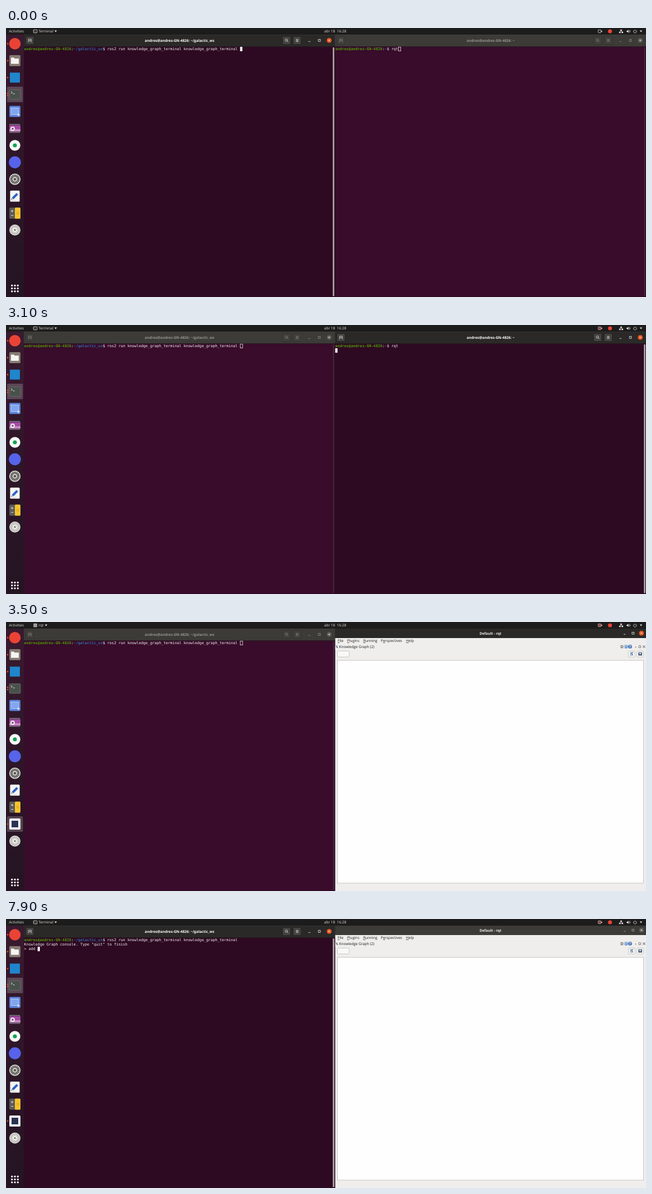
Animation, 1152 px wide and 486 px high, one loop 8 s. Source, as an HTML page:

```html
<!DOCTYPE html>
<html lang="en">
<head>
<meta charset="utf-8">
<title>Terminal session</title>
<style>
  html, body { margin: 0; width: 100%; height: 100%; overflow: hidden; background: #1d1d1d; }
  svg { display: block; width: 100vw; height: 100vh; }
  text { font: 6.55px "Open Sans", "Noto Sans", sans-serif; text-rendering: geometricPrecision; white-space: pre; }
  .b { font-weight: 700; font-size: 6.48px; }
  .mono { font: 6.727px "DejaVu Sans Mono", monospace; fill: #f4f1f3; }
  .user { font-weight: 700; fill: #4e9a06; }
  .path { font-weight: 700; fill: #3465a4; }
  .mid { text-anchor: middle; }
</style>
</head>
<body>
<svg id="stage" viewBox="0 0 1152 486" preserveAspectRatio="none"></svg>
<script>
const LOOP = 8000;
const CELL = 4.05, ROW = 8.1, LEFT = 32.6, TOP = 33.9, RIGHT_DX = 560;
const USER = 'andres@andres-GN-4826';

// drawing helpers
const rect = (x, y, w, h, fill, more = '') => `<rect x="${x}" y="${y}" width="${w}" height="${h}" fill="${fill}" ${more}/>`;
const disc = (x, y, r, fill, more = '') => `<circle cx="${x}" cy="${y}" r="${r}" fill="${fill}" ${more}/>`;
const line = (d, color, w = 0.8, more = '') => `<path d="${d}" fill="none" stroke="${color}" stroke-width="${w}" ${more}/>`;
const shape = (d, fill) => `<path d="${d}" fill="${fill}"/>`;
const text = (x, y, s, fill = '#fff', cls = '') => `<text x="${x}" y="${y}" fill="${fill}" class="${cls}">${s}</text>`;
const group = (id, body, more = '') => `<g id="${id}" ${more}>${body}</g>`;
const shift = (x, y, body) => `<g transform="translate(${x} ${y})">${body}</g>`;
const mono = (row, body) => `<text class="mono" x="${LEFT}" y="${TOP + 6.2 + row * ROW}">${body}</text>`;
const grid3 = draw => [-1, 0, 1].flatMap(y => [-1, 0, 1].map(x => draw(x, y))).join('');

function closeButton(x, y, on) {
  return disc(x, y, 4.4, on ? '#e95420' : '#5b5955') +
    line(`M${x - 1.5} ${y - 1.5}l3 3m0 -3l-3 3`, '#fff', 0.8);
}

function minMax(x, y, gap, color) {
  return line(`M${x - 1.7} ${y + 2}h3.4`, color) +
    rect(x + gap - 1.8, y - 1.8, 3.6, 3.6, 'none', `stroke="${color}" stroke-width=".8"`);
}

function header(title, on) {
  const ink = on ? '#f2f1f0' : '#8f8d89';
  const face = on ? '#454341' : '#403f3b', edge = on ? '#1b1a19' : '#2f2e2b';
  const button = x => rect(x - 7.2, 15.2, 14.4, 14.6, face, `rx="1.6" stroke="${edge}" stroke-width=".7"`);
  return rect(32, 12, 560, 21.5, on ? '#2b2928' : '#3c3b37') +
    rect(32, 12, 560, 0.7, on ? '#393735' : '#464541') +
    rect(32, 33, 560, 0.7, '#1f1b1d') +
    button(43) + button(505) + button(524) +
    line('M40.5 24.7v-4.6h5v4.6M39.8 24.8h1.6m3.2 0h1.6M43 21.3v2.6m-1.3 -1.3h2.6', ink, 0.7) +
    `<circle cx="504.6" cy="21.8" r="2" fill="none" stroke="${ink}" stroke-width=".8"/>` +
    line('M506.1 23.3l1.8 1.8', ink, 0.9) +
    line('M521.8 20.6h4.6m-4.6 1.9h4.6m-4.6 1.9h4.6', ink, 0.8) +
    text(312.4, 24.6, title, on ? '#fff' : '#96948f', 'b mid') +
    minMax(546, 22.4, 18, ink) + closeButton(581.7, 22.4, on);
}

function terminal(side, title, lines) {
  return rect(32, 33, 560, 453, '#2a0a20') +
    rect(32, 33, 559, 452, '#380c2a') +
    rect(32, 33, 559, 452, '#2e0a22', `id="bg${side}"`) +
    rect(588.6, 35, 2, 449, '#57404e', 'opacity=".55"') +
    rect(588.2, 35, 2.7, 449.5, '#aca8a5', `id="bar${side}" rx="1"`) +
    lines + rect(0, 0, CELL, ROW, '#fff', `id="cur${side}"`) +
    header(title, false) + group('head' + side, header(title, true));
}

const prompt = (path, cmd) =>
  `<tspan class="user">${USER}</tspan>:<tspan class="path">${path}</tspan>$ ${cmd}`;

// plugin window
function plugin() {
  const u = s => `<tspan text-decoration="underline">${s}</tspan>`;
  const menu = [[597, u('F') + 'ile'], [614, u('P') + 'lugins'], [643, u('R') + 'unning'],
    [674.7, 'P' + u('e') + 'rspectives'], [720, u('H') + 'elp']];
  const button = (x, w) => rect(x, 52.5, w, 10.7, '#f8f8f7', 'rx="1.2" stroke="#bdbbb8" stroke-width=".8"');
  const bar = on => rect(592.6, 12, 559.4, 17.2, on ? '#2b2928' : '#3c3b37') +
    minMax(1113.5, 20.2, 15.2, on ? '#f2f1f0' : '#aaa8a4') + closeButton(1143.8, 20.2, on);
  const body = rect(592.6, 29, 559.4, 464, '#efeeed') +
    menu.map(([x, s]) => text(x, 36.2, s, '#1b1b1b')).join('') +
    line('M593.6 42.6l3.8 4.2', '#3d4a63', 1.2) + line('M597.3 42.4l-3.4 4.4', '#7d8ea8', 1) +
    text(599.4, 47.2, 'Knowledge Graph (2)', '#1b1b1b') +
    rect(1105.5, 41.4, 6.4, 6.6, '#dcdad7') + text(1106.3, 47.2, 'D', '#111') +
    disc(1116.2, 44.5, 3.4, '#7fa3cf') + line('M1114.2 45.6a2 2 0 0 1 4 -2', '#e8f0fa', 0.8) +
    disc(1123.3, 44.5, 3.5, '#4b78b4') + text(1123.3, 46.8, '?', '#fff', 'b mid') +
    text(1132.4, 47.2, '-', '#111', 'b') + text(1138.3, 47.2, 'O', '#111') +
    line('M1146.4 42.6l4 4m0 -4l-4 4', '#777', 1.1) +
    button(596.5, 21.2) + button(1120.3, 11.9) + button(1135.6, 11.9) +
    rect(1123.2, 54.4, 5, 6.6, '#a9bdd3') + line('M1125 55l3.6 5.2m-1.3 -4.6l2 -1', '#4a6284', 1) +
    rect(1138.2, 54.8, 6.8, 5.8, '#4d5f7d') + rect(1140, 56, 3.2, 2, '#dfe6ef') +
    rect(596.6, 69.2, 551, 402.6, '#fefefe', 'stroke="#bcbab7" stroke-width=".8"');
  return rect(588, 8, 568, 480, '#000', 'opacity=".22" rx="4" id="shade"') +
    bar(false) + group('pluginOn', bar(true)) +
    text(872, 22.8, 'Default - rqt', '#f0eeeb', 'b mid') +
    group('pluginBody', body) + rect(592.6, 29, 559.4, 464, '#040808', 'id="blank"');
}

// dock
const tile = fill => rect(-10, -10, 20, 20, fill, 'rx="2"');
const tableIcon = (s, color) => rect(-s, -s, 2 * s, 2 * s, 'none', `stroke="${color}" stroke-width="${s / 4}"`) +
  line(`M${-s} ${-s / 3}h${2 * s}M${-s} ${s / 3}h${2 * s}M${-s / 3} ${-s}v${2 * s}M${s / 3} ${-s}v${2 * s}`, color, s / 4.5);
const icons = [
  disc(0, 0, 10.4, '#ea4335'),
  tile('#857b72') + shape('M-7 -5.5h5l1.5 1.8h7.5v9.5h-14z', '#f6f4f2'),
  rect(-9, -9, 18, 18, '#1f86cc'),
  rect(-10, -8.8, 20, 17.6, '#4a514c', 'rx="1.5" stroke="#6c726c" stroke-width=".8"') +
    line('M-7 -5.4l2.4 1.8l-2.4 1.8M-3.5 -1.2h3.2', '#f2f2f2', 0.9),
  tile('#5c83dc') + rect(-6.8, -6.3, 13.2, 12, '#82a5ee', 'stroke="#fff" stroke-width=".9" stroke-dasharray="1.6 1.1"') +
    line('M6.2 3.4v5m-2.5 -2.5h5', '#fff', 1),
  rect(-10, -8.5, 20, 17, '#241a26') + rect(-10, -5.8, 20, 11.6, '#a64aa6') + rect(-10, 1.5, 20, 4.3, '#c98ac5') +
    line('M-9.5 -7.2h19M-9.5 7.2h19', '#d8d0d8', 1.4, 'stroke-dasharray="1.3 1.1"') +
    disc(-4, 0.6, 4, '#eee8ee') + disc(-4, 0.6, 1.8, '#6d4a70'),
  disc(0, 0, 9.8, '#f7f8f7') + disc(0, 0, 3.6, '#13a052'),
  disc(0, 0, 10.8, '#5663ea'),
  disc(0, 0, 10.2, '#d2d0cc') + disc(0, 0, 7, 'none', 'stroke="#55534f" stroke-width="2.6" stroke-dasharray="2.1 .65"') +
    disc(0, 0, 5, 'none', 'stroke="#55534f" stroke-width="1.3"') + disc(0, 0, 2.2, '#55534f'),
  rect(-8.6, -10, 17.2, 20, '#f5f5f4', 'rx="1.6"') + line('M-4 4.2L4.4 -4.2', '#2f62c8', 4.2) +
    line('M-6.2 6l1.4 -1.4', '#333', 1.3) + line('M-6 8h9', '#c9c9c9', 0.7),
  tile('#5c5b59') + rect(0, -10, 10, 20, '#f7c32e', 'rx="1.5"') +
    line('M-7 -3.6h4.4m-2.2 -2.2v4.4M-7 4.2h4.4', '#eee', 0.9) + line('M2.6 -1.4h5m-5 2.8h5', '#d69c12', 1)
];
const slot = i => 28.4 + i * 30.6;
const dot = (y, x = 3) => disc(x, y, 1.3, '#e95420');
const glow = (y, id) => rect(2, y - 14, 28.4, 28, '#fff', `id="${id}" rx="1.5" opacity=".2"`);

function dock() {
  return rect(0, 12, 32.2, 474, 'url(#dockFill)') +
    glow(120, 'termGlow') +
    icons.map((s, i) => shift(16, slot(i), s)).join('') +
    [28.4, 59, 89.6, 118, 122].map(y => dot(y)).join('') +
    group('slotBusy', rect(10, 354, 19, 18.4, '#fff', 'opacity=".14"') +
      shift(19.8, 363.3, rect(-6.6, -6.6, 13.2, 13.2, '#41404a') + tableIcon(6, '#d5d3d8')) + dot(363.3, 11)) +
    group('slotSeed', disc(17.8, 354, 1.8, '#6b5a66')) +
    group('slotFull', glow(365, 'pluginGlow') + shift(16, 365, tile('#fbfbfc') + rect(-6, -6, 12, 12, '#2a3354')) + dot(365)) +
    group('cd', disc(0, 0, 10, '#d6d5d2') + disc(0, 0, 7, 'none', 'stroke="#bfbebb" stroke-width="2"') +
      disc(0, 0, 3.2, '#f3f3f1') + disc(0, 0, 1.4, '#4c4c3c')) +
    shift(16, 470.5, grid3((x, y) => disc(x * 5.3, y * 5.3, 1.7, '#f4f2f3')));
}

// top bar
const arrow = x => shape(`M${x} 4.6h4.4l-2.2 2.8z`, '#e4e2e0');

function topBar() {
  const ink = '#e4e2e0';
  return rect(0, 0, 1152, 12, '#1d1c1c') + text(5.2, 8.3, 'Activities', ink) +
    group('appTerm', rect(49.4, 3.2, 6.6, 5.6, 'none', `rx=".8" stroke="${ink}" stroke-width=".8"`) +
      line('M50.8 4.8l1.2 1l-1.2 1M52.6 7.2h1.8', ink, 0.6) + text(58.5, 8.3, 'Terminal', ink) + arrow(87.2)) +
    group('appPlugin', shift(52.8, 6, tableIcon(2.8, '#fff')) + text(58.8, 8.3, 'rqt', ink) + arrow(70)) +
    text(592.6, 8.3, 'abr 18  16:28', ink, 'mid') +
    rect(1066, 3.4, 4.8, 5, 'none', `rx=".7" stroke="${ink}" stroke-width=".8"`) +
    shape('M1071 5.9l2 -1.6v3.4z', ink) + disc(1068.4, 5.9, 1.6, '#ef2f2f', 'id="rec"') +
    disc(1087.2, 6, 3.6, '#ea4335') +
    rect(1105.8, 2.8, 2.8, 2.4, ink) + rect(1103.6, 6.8, 2.8, 2.4, ink) + rect(1108, 6.8, 2.8, 2.4, ink) +
    line('M1107.2 5v1M1105 7v-1h4.4v1', ink, 0.6) +
    shape('M1117 4.9h1.4l2 -1.9v6l-2 -1.9h-1.4z', ink) +
    line('M1121.3 4.6a2 2 0 0 1 0 2.8M1122.5 3.5a3.6 3.6 0 0 1 0 5', ink, 0.7) +
    line('M1130.6 4a2.8 2.8 0 1 0 3.4 0M1132.3 2.8v2.8', ink, 0.8) + arrow(1140.8);
}

const stage = document.getElementById('stage');
stage.innerHTML =
  '<defs><linearGradient id="dockFill" x1="0" y1="0" x2="0" y2="1"><stop offset="0" stop-color="#3a1a2f"/>' +
  '<stop offset=".5" stop-color="#2d1628"/><stop offset="1" stop-color="#241422"/></linearGradient></defs>' +
  rect(0, 0, 1152, 486, '#260a1d') +
  terminal('L', USER + ': ~/galactic_ws',
    mono(0, prompt('~/galactic_ws', 'ros2 run knowledge_graph_terminal knowledge_graph_terminal')) +
    group('greeting', mono(1, 'Knowledge Graph console. Type "quit" to finish') + mono(2, '&gt; <tspan id="typed"></tspan>'))) +
  shift(RIGHT_DX, 0, terminal('R', USER + ': ~', mono(0, prompt('~', 'rqt')))) +
  group('plugin', plugin()) + dock() + topBar();

const el = {};
stage.querySelectorAll('[id]').forEach(n => el[n.id] = n);

// step tables: [start ms, value]
const focusL = [[0, 1], [1200, 0.5], [1300, 0.1], [1400, 0], [4900, 1]];
const focusR = [[0, 0], [1200, 0.5], [1300, 0.9], [1400, 1]];
const fade = {
  rec: [[0, 0], [100, 1]],
  headL: focusL, bgL: focusL, headR: focusR,
  bgR: [...focusR, [3300, 0]],
  barL: [[0, 1], [700, 0.6], [800, 0.3], [900, 0], [4900, 1]],
  barR: [[0, 0], [1300, 0.3], [1400, 0.7], [1500, 1], [3300, 0]],
  greeting: [[0, 0], [6300, 1]],
  plugin: [[0, 0], [3300, 0.58], [3400, 0.985], [3500, 1]],
  pluginOn: [[0, 1], [4800, 0]],
  pluginBody: [[0, 0], [3400, 1]],
  blank: [[0, 1], [3400, 0]],
  shade: [[0, 0], [3400, 0.3], [3500, 0]],
  appTerm: [[0, 1], [3300, 0], [4800, 1]],
  appPlugin: [[0, 0], [3300, 1], [4800, 0]],
  termGlow: [[0, 0.2], [3400, 0], [4900, 0.2]],
  pluginGlow: [[0, 0.2], [4900, 0]],
  slotSeed: [[0, 0], [3300, 1], [3400, 0]],
  slotBusy: [[0, 0], [3400, 1], [3500, 0]],
  slotFull: [[0, 0], [3500, 1]]
};
const zoom = [[0, 0.547], [3400, 0.98], [3500, 1]];
const cdY = [[0, 365], [3300, 370], [3400, 385], [3500, 395.8]];
const typed = [[0, ''], [7400, 'a'], [7500, 'ad'], [7700, 'add'], [7900, 'add ']];

// cursor: [column, row, hollow] or null while blinked off
const cursor = {
  curL: [[0, [96, 0]], [300, null], [900, [96, 0]], [1100, [96, 0, 1]], [4800, [96, 0]], [5400, null],
    [5500, [0, 1]], [6100, null], [6700, [2, 2]], [7300, null],
    [7400, [3, 2]], [7500, [4, 2]], [7700, [5, 2]], [7900, [6, 2]]],
  curR: [[0, [28, 0, 1]], [1100, [28, 0]], [1700, null], [1900, [0, 1]], [2500, null],
    [3100, [0, 1]], [3300, [0, 1, 1]]]
};

function at(table, t) {
  let value = table[0][1];
  for (const [start, v] of table) if (t >= start) value = v;
  return value;
}

function set(node, attrs) {
  for (const k in attrs) node.setAttribute(k, attrs[k]);
}

function placeCursor(node, pos) {
  if (!pos) return set(node, { opacity: 0 });
  const [col, row, hollow] = pos, inset = hollow ? 0.4 : 0;
  set(node, {
    opacity: 1, x: LEFT + col * CELL + inset, y: TOP + row * ROW + inset,
    width: CELL + (hollow ? 0.1 : 0), height: ROW - 2 * inset,
    fill: hollow ? 'none' : '#fff', stroke: hollow ? '#f0e8ee' : 'none', 'stroke-width': 0.8
  });
}

function draw(t) {
  for (const id in fade) set(el[id], { opacity: at(fade[id], t) });
  for (const id in cursor) placeCursor(el[id], at(cursor[id], t));
  set(el.plugin, { transform: `translate(872.3 471) scale(${at(zoom, t)}) translate(-872.3 -471)` });
  set(el.cd, { transform: `translate(16 ${at(cdY, t)})` });
  el.typed.textContent = at(typed, t);
}

const start = performance.now();
function tick() {
  draw((performance.now() - start) % LOOP);
  requestAnimationFrame(tick);
}
tick();
</script>
</body>
</html>
```
